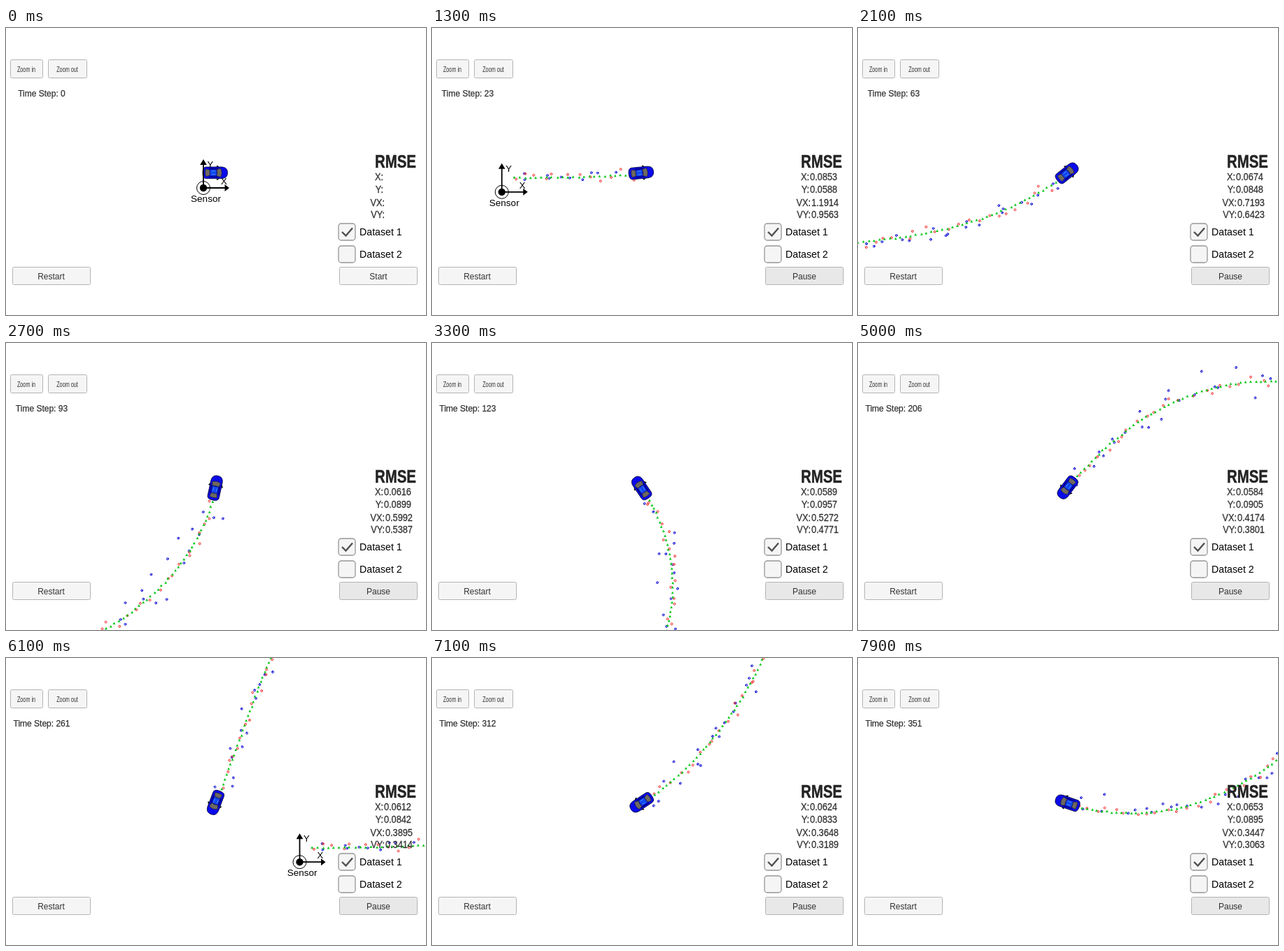
An HTML page for the animation above (8 s loop, 600 px wide and 411 px high).

```html
<!DOCTYPE html>
<html lang="en">
<head>
<meta charset="utf-8">
<title>Sensor fusion tracker</title>
<style>
  html, body { margin: 0; width: 100%; height: 100%; overflow: hidden; background: #fff; }
  svg { display: block; width: 600px; height: 411px; font-family: "Liberation Sans", Arial, sans-serif; }
  .btn { fill: #f5f5f5; stroke: #b4b4b4; }
  .txt { fill: #323232; font-size: 12px; text-anchor: middle; }
  .box { fill: #f5f5f5; stroke: #969696; stroke-width: 1.3; }
  .mark { fill: none; stroke-width: 1; }
  .glass { fill: #6e6960; stroke: #1e1e32; stroke-width: .6; }
</style>
</head>
<body>
<svg viewBox="0 0 600 411">
  <g id="world">
    <path id="radar" class="mark" stroke="#0000d2"/>
    <path id="laser" class="mark" stroke="#f01414"/>
    <path id="guess" fill="#00c814"/>
  </g>
  <g id="car">
    <path d="M2-10l3 2M2 10l3-2" stroke="#000" stroke-width="1.6"/>
    <path d="M-13-8.300H9C15-8 17.500-5 17.500 0S15 8 9 8.300H-13C-17 8-18 5-18 0S-17-8-13-8.300Z" fill="#0a0aeb" stroke="#000032" stroke-width=".8"/>
    <path d="M-9-6H4M-9 6H4" stroke="#00005a"/>
    <rect x="-8" y="-4.500" width="10" height="9" rx="1.500" fill="#1446f0" stroke="#000078" stroke-width=".6"/>
    <path d="M-5-2.500H0M-5 2.500H0" stroke="#3c8cff"/>
    <path class="glass" d="M2-4.500L7.500-6.200Q11 0 7.500 6.200L2 4.500Q3.500 0 2-4.500Z"/>
    <path class="glass" d="M-8-4L-13.500-5.500Q-15.500 0-13.500 5.500L-8 4Z"/>
  </g>
  <g id="sensor">
    <circle r="9.500" fill="none" stroke="#000"/>
    <circle r="5.200"/>
    <path d="M0 0V-35M0 0H32" stroke="#000" stroke-width="1.800"/>
    <path d="M0-41l4.800 8h-9.600zM37 0l-6.500 5v-10z"/>
    <text x="5.500" y="-29" font-size="13">Y</text>
    <text x="25" y="-5" font-size="13">X</text>
    <text x="3.500" y="20" font-size="13.500" text-anchor="middle">Sensor</text>
  </g>

  <rect class="btn" x="6.500" y="45.500" width="46" height="26" rx="2"/>
  <rect class="btn" x="60.500" y="45.500" width="55" height="26" rx="2"/>
  <g class="txt" style="font-size:11px">
    <text transform="translate(29 62.500) scale(.66 1)">Zoom in</text>
    <text transform="translate(87.500 62.500) scale(.66 1)">Zoom out</text>
  </g>
  <text id="step" class="txt" x="51" y="98" stroke="#323232" stroke-width=".25"></text>

  <rect class="btn" x="9.500" y="342.500" width="111" height="25" rx="2"/>
  <text class="txt" x="64.500" y="360">Restart</text>
  <rect id="runBox" class="btn" x="476.500" y="342.500" width="111" height="25" rx="2"/>
  <text id="run" class="txt" x="532" y="360"></text>

  <text transform="translate(527 200) scale(.785 1)" font-size="26" font-weight="bold" fill="#232323" stroke="#232323" stroke-width=".5">RMSE</text>
  <g id="table" font-size="15" fill="#323232" stroke="#323232" stroke-width=".3"></g>

  <rect class="box" x="475" y="280" width="24" height="24" rx="4"/>
  <rect class="box" x="475" y="312" width="24" height="24" rx="4"/>
  <path d="M480 292l5.500 5.500L495 286.500" fill="none" stroke="#505050" stroke-width="2.400"/>
  <g font-size="14.200">
    <text x="505" y="297">Dataset 1</text>
    <text x="505" y="329">Dataset 2</text>
  </g>
</svg>
<script>
const $ = id => document.getElementById(id);
const SCALE = 29.3, SQUASH = .97, CX = 300, CY = 208, TURN = 2 * Math.PI / 500;

// time, step, then the four error values
const KEYS = [
  [900, 3, .2, .05, 3.3, 2.5],
  [2100, 63, .0674, .0848, .7193, .6423],
  [3300, 123, .0589, .0957, .5272, .4771],
  [5000, 206, .0584, .0905, .4174, .3801],
  [6100, 261, .0612, .0842, .3895, .3414],
  [7100, 312, .0624, .0833, .3648, .3189],
  [7900, 351, .0653, .0895, .3447, .3063]
];

let seed = 7;
const rand = () => (seed = (seed * 16807) % 2147483647) / 2147483647;
const noise = sd => (rand() + rand() + rand() - 1.5) * 2 * sd;
const ring = (x, y) =>
  `M${(x - 1.4).toFixed(1)} ${y.toFixed(1)}a1.4 1.4 0 1 0 2.8 0a1.4 1.4 0 1 0-2.8 0`;
const yawAt = k => 2.1885 * (1 - Math.cos(TURN * k));

// Drive with sinusoidal yaw rate and speed; positions are relative to the sensor.
const poses = [], radar = [], laser = [], guess = [];
for (let k = 0, x = 18, y = -21; k <= 360; k++) {
  poses.push({ x, y, yaw: yawAt(k) });
  guess.push(`M${(x + noise(.5)).toFixed(1)} ${(y - 1.8 + noise(.5)).toFixed(1)}l1.900 3.500h-3.800z`);
  if (k % 2) {
    const r = Math.hypot(x, y) + noise(.25 * SCALE);
    const a = Math.atan2(y, x) + noise(.022);
    radar.push(ring(r * Math.cos(a), r * Math.sin(a)) +
      `m1.400 0l${(2 * Math.cos(a)).toFixed(1)} ${(2 * Math.sin(a)).toFixed(1)}`);
  } else {
    laser.push(ring(x + noise(.12 * SCALE), y + noise(.12 * SCALE)));
  }
  const yaw = yawAt(k + .5);
  const d = (5 + .2 * Math.cos(2 * TURN * k)) * .05 * SCALE;
  x += d * Math.cos(yaw);
  y -= d * Math.sin(yaw) * SQUASH;
}

const rows = [["X:", 539, 217.5], ["Y:", 539, 235.5], ["VX:", 541, 254.7], ["VY:", 541, 271.5]];
$("table").innerHTML = rows.map(([name, x, y], i) =>
  `<text transform="translate(${x} ${y}) scale(.85 1)" text-anchor="end">${name}</text>` +
  `<text id="err${i}" transform="translate(${x + 1} ${y}) scale(.85 1)"></text>`).join("");

// Errors shrink with the root of the step count, so blend value * sqrt(step).
function sample(t) {
  if (t < 900) return { step: 0, errs: ["", "", "", ""] };
  let i = 0;
  while (i < KEYS.length - 2 && t >= KEYS[i + 1][0]) i++;
  const a = KEYS[i], b = KEYS[i + 1], u = (t - a[0]) / (b[0] - a[0]);
  const mix = (p, q) => p + (q - p) * u;
  const step = Math.round(mix(a[1], b[1]));
  const errs = [2, 3, 4, 5].map(j =>
    (mix(a[j] * Math.sqrt(a[1]), b[j] * Math.sqrt(b[1])) / Math.sqrt(step)).toFixed(4));
  return { step, errs };
}

function draw(t) {
  const { step, errs } = sample(t);
  // Once running, the car is one pose ahead of the counter.
  const { x, y, yaw } = poses[step && step + 1];
  const move = `translate(${(CX - x).toFixed(2)} ${(CY - y).toFixed(2)})`;
  $("world").setAttribute("transform", move);
  $("sensor").setAttribute("transform", move);
  $("car").setAttribute("transform", `translate(299 207.3) rotate(${-yaw * 180 / Math.PI})`);
  $("guess").setAttribute("d", guess.slice(0, step).join(""));
  $("radar").setAttribute("d", radar.slice(0, step >> 1).join(""));
  $("laser").setAttribute("d", laser.slice(0, (step + 1) >> 1).join(""));
  $("step").textContent = "Time Step: " + step;
  $("run").textContent = step ? "Pause" : "Start";
  $("runBox").style.fill = step ? "#e8e8e8" : "";
  errs.forEach((e, i) => $("err" + i).textContent = e);
}

let start, last = -1;
function tick(now) {
  start ??= now;
  const t = Math.floor((now - start) % 8000 / 100) * 100;
  if (t !== last) draw(last = t);
  requestAnimationFrame(tick);
}
draw(0);
requestAnimationFrame(tick);
</script>
</body>
</html>
```
